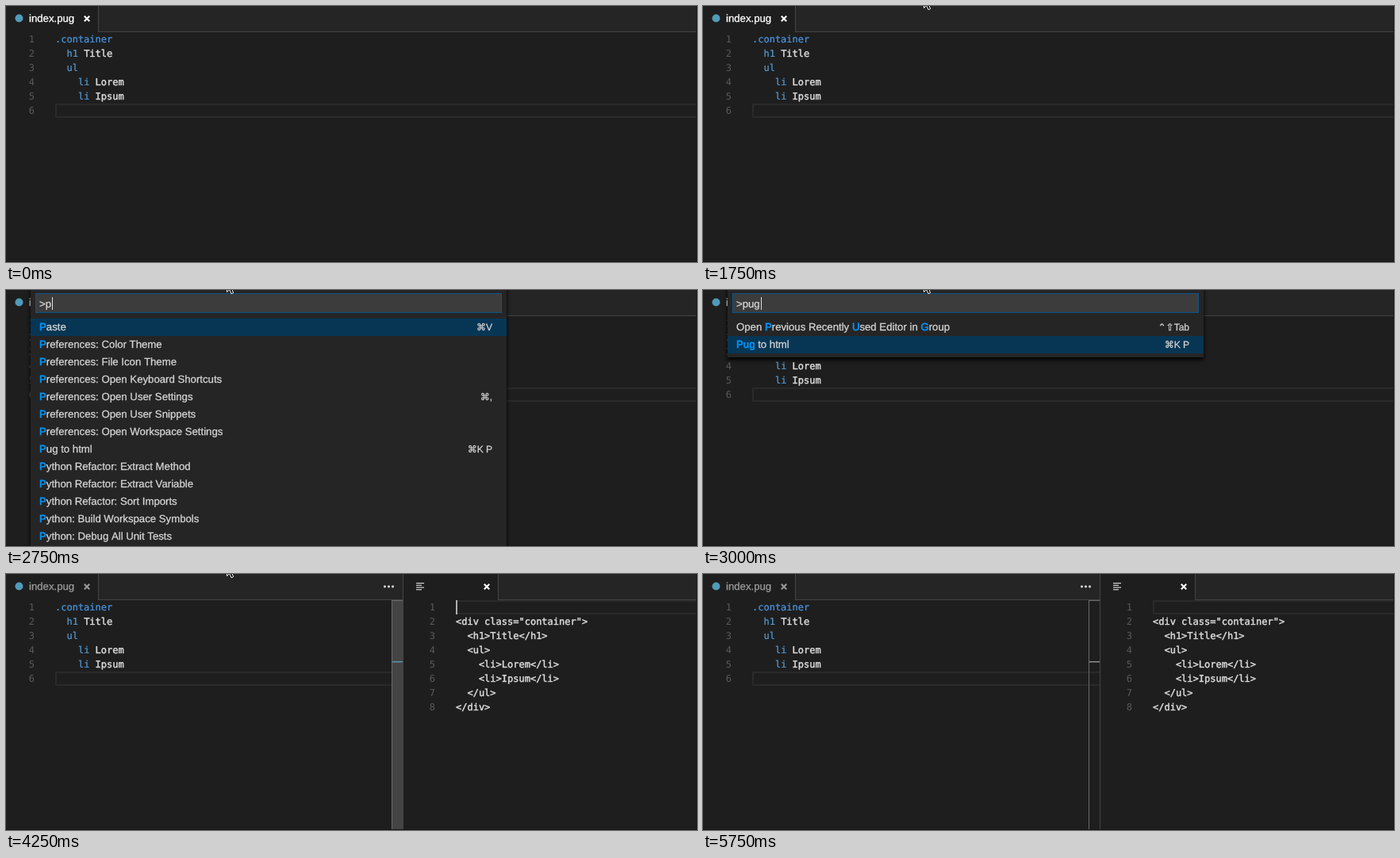
Recreate the animation shown at these times as an HTML page. Size 871 by 323 pixels, loop 6500 ms.

```html
<!DOCTYPE html>
<html lang="en">
<head>
<meta charset="utf-8">
<title>Pug to html</title>
<style>
  html, body { margin: 0; height: 100%; overflow: hidden; background: #1e1e1e; }
  svg { display: block; width: 871px; height: 323px; }
  text { fill: currentColor; stroke: currentColor; stroke-width: .3px; text-rendering: geometricPrecision; }
  .ui { font: 13.2px "Liberation Sans", "DejaVu Sans", sans-serif; color: #d4d4d4; }
  .tab { font: 13.2px "Liberation Sans", sans-serif; color: inherit; }
  .key { font: 12px "Liberation Sans", "DejaVu Sans", sans-serif; color: #d0d0d0; text-anchor: end; }
  .code { font: 12px "DejaVu Sans Mono", monospace; color: #dcdcdc; stroke-width: .45px; }
  .num { font: 12px "DejaVu Sans Mono", monospace; color: #5a5a5a; text-anchor: end; stroke-width: 0; }
  .code tspan { fill: #569cd6; stroke: #569cd6; stroke-width: .2px; }
  .code tspan.sel { fill: #4b98e6; stroke: #4b98e6; }
  .ui tspan { fill: #0097fb; stroke: #0097fb; stroke-width: .6px; }
  .shadow { filter: drop-shadow(0 3px 2.5px #000); }
</style>
</head>
<body>
<script>
const LOOP = 6500;
const NS = 'http://www.w3.org/2000/svg';

function add(parent, tag, attrs = {}) {
  const el = document.createElementNS(NS, tag);
  for (const k in attrs) el.setAttribute(k, attrs[k]);
  return parent.appendChild(el);
}
const group = parent => add(parent, 'g');
const rect = (parent, x, y, width, height, fill) => add(parent, 'rect', { x, y, width, height, fill });

// Parts between asterisks are highlighted.
function text(parent, x, y, cls, str, mark = '') {
  const el = add(parent, 'text', { x, y, class: cls });
  str.replace(/ /g, '\u00a0').split('*').forEach((part, i) => {
    if (!part) return;
    if (i % 2) add(el, 'tspan', { class: mark }).textContent = part;
    else el.append(part);
  });
  return el;
}

// Hold each value until the next time in the table.
function hold(el, prop, table) {
  const frames = table.map(([t, v]) => ({ offset: t / LOOP, [prop]: v, easing: 'steps(1, end)' }));
  frames.push({ offset: 1, [prop]: table[table.length - 1][1] });
  el.animate(frames, { duration: LOOP, iterations: Infinity });
}
function show(el, from, to) {
  hold(el, 'opacity', [[0, 0], [from, 1], [to, 0]]);
}

function lines(parent, numX, x, rows, count) {
  for (let i = 0; i < count; i++) {
    const y = 46 + 18 * i;
    text(parent, numX, y, 'num', String(i + 1));
    if (rows[i]) text(parent, x, y, 'code', rows[i], i ? '' : 'sel');
  }
}
function currentLine(parent, x, y) {
  add(parent, 'rect', { x: x + 1, y: y + 1, width: 880 - x, height: 16, fill: 'none', stroke: '#2a2a2a', 'stroke-width': 2 });
}
function cross(parent, x, y) {
  add(parent, 'path', { d: `M${x - 3.2} ${y - 3.2}l6.4 6.4m0-6.4l-6.4 6.4`, stroke: 'currentColor', 'stroke-width': 2.1 });
}

const svg = add(document.body, 'svg', { viewBox: '0 0 871 323' });
rect(svg, 0, 0, 871, 323, '#1e1e1e');

// Pug editor
const editor = group(svg);
rect(editor, 116, 0, 755, 33, '#252526');
rect(editor, 116, 0, 1, 33, '#444');
rect(editor, 116, 32, 755, 1, '#444');
add(editor, 'circle', { cx: 16.5, cy: 15.5, r: 5, fill: '#519aba' });
const tab = group(editor);
text(tab, 29, 20, 'tab', 'index.pug');
cross(tab, 102, 16);
hold(tab, 'color', [[0, '#ffffff'], [4250, '#9a9a9a']]);
currentLine(editor, 62, 123);
lines(editor, 36, 62, ['*.container*', '  *h1* Title', '  *ul*', '    *li* Lorem', '    *li* Ipsum'], 6);
show(rect(editor, 62, 123, 2, 18, '#aeafad'), 1250, 1750);

// Html editor on the right
const split = group(svg);
for (const x of [477.5, 482.5, 487.5]) add(split, 'circle', { cx: x, cy: 15.8, r: 1.6, fill: '#d0d0d0' });
const slider = rect(split, 487, 34, 13, 289, '#444');
hold(slider, 'opacity', [[0, 1], [5000, .5], [5500, 0]]);
rect(split, 486, 33, 1, 290, '#6a6a6a');
rect(split, 486, 33, 14, 1, '#6a6a6a');
const mark = rect(split, 487, 110, 13, 1.5, '#5f8fae');
hold(mark, 'fill', [[0, '#5f8fae'], [5000, '#7b8e99'], [5500, '#909090']]);
rect(split, 500, 0, 371, 323, '#1e1e1e');
rect(split, 500, 0, 1, 323, '#444');
rect(split, 620, 0, 251, 33, '#252526');
rect(split, 620, 0, 1, 33, '#444');
rect(split, 620, 32, 251, 1, '#444');
[10, 7, 10, 7].forEach((w, i) => rect(split, 517, 11 + 2.7 * i, w, 1.2, '#d0d0d0'));
const close = add(split, 'g', { color: '#fff' });
cross(close, 606, 16);
currentLine(split, 567, 33);
lines(split, 541, 567, ['', '<div class="container">', '  <h1>Title</h1>', '  <ul>',
  '    <li>Lorem</li>', '    <li>Ipsum</li>', '  </ul>', '</div>'], 8);
show(rect(split, 567, 33, 2, 18, '#aeafad'), 4250, 5750);
show(split, 4250, LOOP);

rect(svg, 0, 322, 871, 1, '#161616');
rect(svg, 870, 0, 1, 323, '#161616');

// Command palette: rows are "label|shortcut"
function palette({ from, to, typed, caret, caretEnd, height, selected, rows }) {
  const g = group(svg);
  rect(g, 31, -20, 600, height + 20, '#252526').setAttribute('class', 'shadow');
  add(g, 'rect', { x: 37.5, y: 4.5, width: 587, height: 24, fill: '#3c3c3c', stroke: '#0b5486' });
  text(g, 42, 22, 'ui', typed);
  show(rect(g, caret, 9, 1, 16, '#e0e0e0'), from, caretEnd || to);
  rect(g, 31, 36 + 22 * selected, 600, 22, '#073655');
  rows.forEach((row, i) => {
    const [label, keys] = row.split('|');
    const y = 51 + 22 * i;
    text(g, 42, y, 'ui', label);
    if (keys) text(g, 613, y, 'key', keys);
  });
  show(g, from, to);
}

palette({
  from: 2250, to: 2750, typed: '>', caret: 50, height: 340, selected: 0,
  rows: ['.NET: Generate Assets for Build and Debug', 'Add Cursor Above|⌥⌘↑', 'Add Cursor Below|⌥⌘↓',
    'Add gitignore', 'Add Line Comment|⌘K ⌘C', 'Add Selection To Next Find Match|⌘D',
    'Add Selection To Previous Find Match', 'Change All Occurrences|⌘F2', 'Change End of Line Sequence',
    'Change File Encoding', 'Change Language Mode|⌘K M', 'Clear Editor History',
    'Close Notification Messages|Escape, ⇧Escape']
});
palette({
  from: 2750, to: 3000, typed: '>p', caret: 58, height: 340, selected: 0,
  rows: ['*P*aste|⌘V', '*P*references: Color Theme', '*P*references: File Icon Theme',
    '*P*references: Open Keyboard Shortcuts', '*P*references: Open User Settings|⌘,',
    '*P*references: Open User Snippets', '*P*references: Open Workspace Settings', '*P*ug to html|⌘K P',
    '*P*ython Refactor: Extract Method', '*P*ython Refactor: Extract Variable',
    '*P*ython Refactor: Sort Imports', '*P*ython: Build Workspace Symbols', '*P*ython: Debug All Unit Tests']
});
palette({
  from: 3000, to: 4250, typed: '>pug', caret: 73, caretEnd: 4000, height: 85, selected: 1,
  rows: ['Open *P*revious Recently *U*sed Editor in *G*roup|⌃⇧Tab', '*Pug* to html|⌘K P']
});

// Mouse pointer, mostly above the top edge
const pointer = add(svg, 'path', {
  d: 'M278.5 0V14.5L281.8 11.4L284 16.6L286.6 15.5L284.4 10.5H288.5Z',
  fill: '#000', stroke: '#fff', 'stroke-width': 1
});
const at = bottom => `translateY(${bottom - 17}px)`;
hold(pointer, 'transform', [[0, at(-5)], [250, at(2)], [500, at(6)], [750, at(4)], [1000, at(5)], [5750, at(-5)]]);
</script>
</body>
</html>
```
